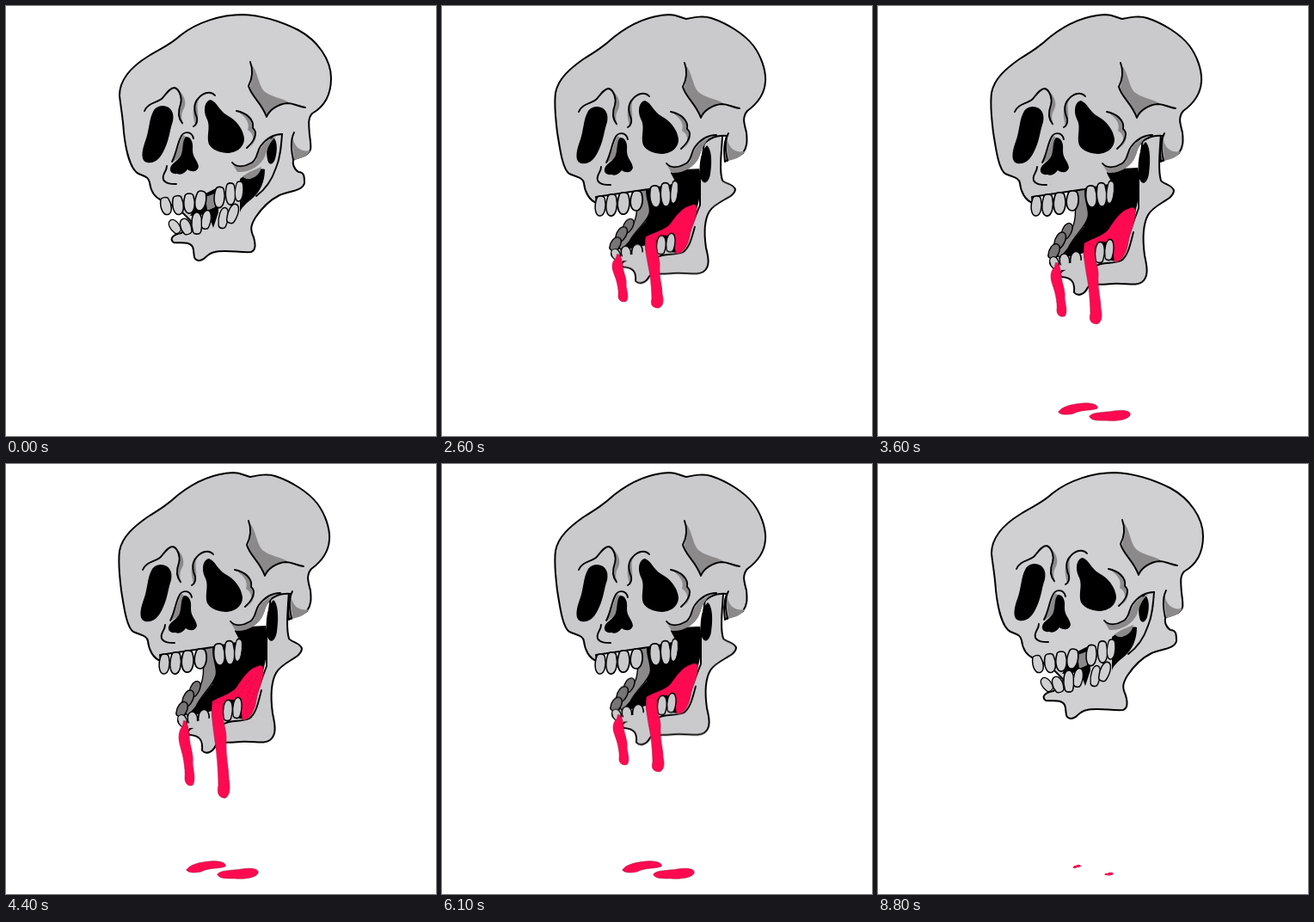
These frames come from a looping animation (500 by 500 pixels, 8900 ms). An HTML page without scripts:

```html
<!DOCTYPE html>
<html lang="en">
<head>
<meta charset="utf-8">
<title>Skull</title>
<style>
html, body { margin: 0; width: 100%; height: 100%; overflow: hidden; background: #fff; }
svg { display: block; width: 100vw; height: 100vh; }
path { stroke-linecap: round; stroke-linejoin: round; }
.bone { fill: var(--bone); stroke: #000; stroke-width: 2; }
.tooth { stroke: #000; stroke-width: 1.6; }
.line { fill: none; stroke: #000; stroke-width: 1.9; }
.gray { fill: #8b898a; }
.red { fill: #ff0a50; stroke: #a8123f; stroke-width: .6; }
.closed { --bone: #d0d0d2; }
.open { --bone: #cacacc; }
.closed, .open, .jaw, .pool, .hatch, .drip, .drop, .puddle, .bead {
  animation: 8.9s step-end infinite;
}
.closed { animation-name: closed; }
.open { animation-name: open; }
.jaw { animation-name: jaw; transform-origin: 340px 200px; }
.pool { animation-name: pool; }
.hatch { animation-name: hatch; }
.drip { animation-name: drip; }
.drip.a { transform-origin: 207px 298px; }
.drip.b { transform-origin: 246px 278px; }
.drop { animation-name: drop; }
.puddle { animation-name: puddle; }
.puddle.a { transform-origin: 231px 468px; }
.puddle.b { transform-origin: 268px 477px; }
.bead { animation-name: bead; }
.bead.a { transform-origin: 204px 253px; }
.bead.b { transform-origin: 243px 245px; }

@keyframes closed {
  0%, 74.157% { opacity: 1; }
  28.089% { opacity: 0; }
}
@keyframes open {
  0%, 74.157% { opacity: 0; }
  28.089% { opacity: 1; }
}
@keyframes jaw {
  0%, 28.089% { transform: translate(-6px) scaleY(.8); }
  29.213% { transform: translate(-3px) scaleY(.9); }
  30.337% { transform: none; }
  68.539% { transform: translate(-2px) scaleY(.93); }
  70.786% { transform: translate(-4px) scaleY(.87); }
  71.91% { transform: translate(-6px) scaleY(.82); }
  73.033% { transform: translate(-8px) scaleY(.77); }
}
@keyframes pool {
  0%, 73.033% { opacity: 0; }
  29.213% { opacity: 1; }
}
@keyframes hatch {
  0%, 44.943%, 51.685%, 59.55% { opacity: 0; }
  42.696%, 49.438%, 56.179% { opacity: 1; }
}
@keyframes drip {
  0% { transform: scaleY(.3); }
  29.213% { transform: scaleY(.75); }
  30.337% { transform: scaleY(1.25); }
  32.584% { transform: none; }
  34.831%, 38.202%, 42.696%, 49.438%, 56.179% { transform: scaleY(.92); }
  35.955%, 39.325%, 44.943%, 51.685%, 59.55% { transform: scaleY(1.01); }
  37.078%, 40.449%, 47.191%, 53.932%, 64.044% { transform: scaleY(.765); }
  70.786% { transform: scaleY(.5); }
  71.91% { transform: scaleY(.25); }
  73.033% { transform: scaleY(0); }
}
@keyframes drop {
  0%, 37.078% { opacity: 0; }
  32.584% { opacity: 1; }
  34.831% { opacity: 1; transform: translateY(14px); }
  35.955% { opacity: 1; transform: translateY(32px); }
}
@keyframes puddle {
  0% { transform: scale(0); }
  37.078% { transform: scale(.4, .6); }
  38.202% { transform: scale(.75, .85); }
  39.325% { transform: none; }
  96.629% { transform: scale(.75, .8); }
  97.752% { transform: scale(.45, .5); }
  98.876% { transform: scale(.21, .28); }
}
@keyframes bead {
  0%, 28.089% { opacity: 0; }
  22.471% { opacity: 1; }
  25.842% { opacity: 1; transform: scaleY(1.42); }
}
</style>
</head>
<body>
<svg viewBox="0 0 500 500">
<defs>
  <path id="t" class="tooth" d="M-5 -9C-4 -13 4 -13 5 -9C8 0 6 10 1 11C-5 12 -8 2 -5 -9Z"/>
  <g id="face">
    <path d="M183 116C192 117 196 124 194 134C190 146 190 154 185 165C180 177 173 184 164 182C156 180 158 168 162 157C167 144 166 131 172 121C175 117 179 116 183 116Z"/>
    <path d="M238 109C246 112 247 121 257 127C267 132 276 143 277 154C277 165 267 171 257 171C246 170 236 166 235 157C234 147 238 139 233 130C229 121 231 110 238 109Z"/>
    <path d="M209 152C215 152 218 158 217 167C217 177 223 179 224 187C222 194 215 193 211 190C208 194 204 197 199 195C192 196 189 191 192 186C195 181 202 179 204 171C205 163 203 155 209 152Z"/>
    <path class="gray" d="M197 95C206 101 211 111 207 119C203 126 204 131 206 139C199 132 200 124 203 116C204 107 202 101 197 95Z"/>
    <path class="line" d="M161 122C165 112 176 113 182 107C187 101 191 95 196 95C202 97 205 107 203 114C200 122 200 130 205 136"/>
    <path class="gray" d="M225 107C219 115 227 126 221 140C217 130 215 115 225 107Z"/>
    <path class="line" d="M243 104C238 98 229 101 224 107C217 114 219 123 222 130C223 135 221 138 218 140"/>
    <path class="gray" d="M193 182C199 172 201 160 206 150L209 152C204 158 207 169 202 176Z"/>
    <path class="line" d="M193 181C198 172 199 161 203 153C206 145 216 145 218 154"/>
    <path class="line" d="M187 186C187 193 181 195 183 202C186 207 192 207 198 207"/>
    <path class="gray" d="M268 122C281 123 291 132 286 142C294 148 291 157 284 164C289 155 288 148 281 144C284 135 278 128 268 122Z"/>
    <path class="line" d="M268 122C279 124 289 132 287 142C294 147 288 158 280 165"/>
    <path class="gray" d="M285 67C293 76 293 91 300 99C308 106 321 107 329 112C320 113 308 118 303 129C297 116 287 106 283 96C287 86 286 77 285 67Z"/>
    <path class="line" d="M284 65C288 76 286 85 282 93C285 105 297 112 303 129C306 121 316 114 327 113C335 113 340 117 348 118"/>
    <path class="gray" d="M263 183C272 188 286 185 291 179C293 171 296 163 304 157L316 150C306 158 304 166 301 175C296 186 283 194 269 193Z"/>
    <path class="line" d="M263 182C269 189 279 186 286 182C293 177 291 170 296 163C302 155 311 149 321 149"/>
    <path class="gray" d="M333 152C332 166 336 172 334 179C345 177 351 174 354 168C344 170 336 166 333 152Z"/>
    <path class="line" d="M335 147C330 157 332 169 334 179"/>
  </g>
</defs>

<g class="closed">
  <path class="bone" d="M181 226C172 222 168 214 167 205C166 199 161 198 154 195C144 190 139 165 137 147C136 130 133 115 132 104C132 84 148 69 166 58C180 49 190 46 203 34C222 19 250 10 275 10C300 11 322 19 340 28C362 40 378 62 378 84C378 104 370 117 356 125C351 130 352 138 353 150C354 157 355 163 354 167C351 175 340 176 335 178C332 182 335 190 340 193C347 193 347 199 347 206C345 215 330 215 318 220C306 226 296 237 290 246C284 256 284 260 288 269C290 276 291 284 285 286C272 287 255 283 243 286C232 288 232 296 224 296C216 295 220 287 217 280C213 273 203 276 195 275C190 271 193 266 204 264L216 251L200 235Z"/>
  <path d="M309 152C316 154 316 168 313 178C310 186 305 185 304 178C302 169 304 159 309 152ZM272 201C282 194 292 188 301 190C301 204 296 216 285 225C279 230 274 234 272 240Z"/>
  <path class="gray" d="M283 193L297 187C296 194 291 199 284 201C280 202 277 200 275 198Z"/>
  <path class="line" d="M321 149C320 163 319 176 314 188C309 203 302 213 291 221"/>
  <path d="M228 220L246 211L247 240L241 258L235 242L214 244Z"/>
  <path class="gray" d="M232 222L243 218L243 234L234 238Z"/>
  <use href="#face"/>
  <g fill="#d0d0d2">
    <use href="#t" transform="translate(186 233)rotate(-12)scale(.95 .88)"/>
    <use href="#t" transform="translate(200 232)rotate(-6)scale(1 .95)"/>
    <use href="#t" transform="translate(213 230)"/>
    <use href="#t" transform="translate(226 227)rotate(10)"/>
    <use href="#t" transform="translate(248 223)rotate(4)scale(.95 1.05)"/>
    <use href="#t" transform="translate(261 219)scale(.9 1.1)"/>
    <use href="#t" transform="translate(271 216)rotate(5)scale(.75 1)"/>
    <use href="#t" transform="translate(196 256)rotate(145)scale(.85 .75)"/>
    <use href="#t" transform="translate(209 256)rotate(160)scale(.95 .82)"/>
    <use href="#t" transform="translate(222 252)rotate(180)scale(.95 1.1)"/>
    <use href="#t" transform="translate(233 248)rotate(190)scale(.85 .95)"/>
    <use href="#t" transform="translate(253 246)rotate(190)scale(.85 1.05)"/>
    <use href="#t" transform="translate(264 241)rotate(200)scale(.9 1)"/>
  </g>
  <path class="red bead a" d="M203 254C203 259 209 261 208 266C207 270 203 270 202 267C201 262 201 257 203 254Z"/>
  <path class="red bead b" d="M243 246C245 253 249 257 249 263C249 269 246 271 243 269C240 265 243 259 242 254Z"/>
  <path class="bead b" fill="none" stroke="#d6a0b0" stroke-width="1.3" d="M245 259C247 262 247 265 245 267"/>
</g>

<g class="open">
  <g class="jaw">
    <path class="bone" d="M331 120C328 165 325 190 329 203C333 208 343 208 344 215C343 226 322 229 314 243C307 256 308 275 310 290C312 300 316 314 307 321C300 326 290 322 272 323C258 325 248 322 244 327C240 336 232 338 228 333C229 322 226 316 214 315C209 313 212 308 218 306C208 306 200 304 200 298L212 288L290 270L303 235L303 195L312 120Z"/>
    <path d="M311 158C317 163 317 181 315 195C313 207 307 209 304 201C301 188 303 166 311 158ZM264 190L302 188C304 205 304 222 300 237L290 270L274 298L253 284L210 294L240 256L240 208Z"/>
    <path class="gray" stroke="#000" stroke-width="1.4" d="M232 214L241 212C239 226 247 238 244 246C241 258 227 268 221 282L212 293L207 288L224 262C230 252 231 236 228 222Z"/>
    <g fill="#777576">
      <use href="#t" transform="translate(220 261)rotate(205)scale(.85 .8)"/>
      <use href="#t" transform="translate(212 272)rotate(205)scale(.9 .85)"/>
      <use href="#t" transform="translate(205 285)rotate(205)scale(.9 .8)"/>
    </g>
    <g fill="#cacacc">
      <use href="#t" transform="translate(205 298)rotate(160)scale(.8 .6)"/>
      <use href="#t" transform="translate(217 296)rotate(175)scale(.9 .7)"/>
      <use href="#t" transform="translate(230 295)rotate(185)scale(1 .85)"/>
    </g>
    <path fill="#cacacc" d="M210 302L252 292L282 298L282 306L212 307Z"/>
    <path class="line" d="M252 303C262 296 272 301 283 296C291 290 293 278 297 263"/>
    <g class="pool">
      <path class="red" d="M240 276C250 270 261 268 268 260C275 249 283 238 291 236C297 233 300 234 299 242C299 253 293 262 291 275C289 286 285 296 276 298C272 292 276 281 270 276C264 273 259 273 253 279L251 294L240 293Z"/>
      <path class="hatch" fill="none" stroke="#9c2145" stroke-width=".8" stroke-dasharray="2 3" d="M262 269L275 257M267 273L286 247M280 270L294 243M279 286L291 262"/>
    </g>
    <g fill="#cacacc">
      <use href="#t" transform="translate(258 286)rotate(184)scale(.85 1.05)"/>
      <use href="#t" transform="translate(269 283)rotate(186)scale(.8 1.05)"/>
    </g>
    <path class="red drip a" d="M207 298C211 300 212 307 213 318C214 331 218 341 217 352C218 363 221 374 217 380C213 382 208 379 208 371C209 358 206 344 203 332C200 322 200 312 205 306Z"/>
    <path class="red drip b" d="M240 278C245 275 252 276 252 285C251 299 256 310 256 322C255 344 259 358 259 374C261 386 260 395 255 398C248 398 245 393 247 382C247 361 245 342 243 326C241 309 238 292 240 278Z"/>
  </g>
  <path class="bone" d="M180 229C171 226 166 216 165 206C164 199 156 199 148 195C140 190 137 165 134 147C132 130 130 115 132 101C135 84 150 72 164 62C180 52 188 47 200 36C219 21 242 11 264 10C274 10 278 14 284 15C294 13 304 11 313 14C331 20 351 32 362 46C371 58 377 75 376 88C375 104 366 114 355 122C349 129 351 136 354 147C355 157 355 164 350 171C344 176 335 176 329 181C328 171 327 162 331 151C318 150 306 155 301 166C298 180 285 192 267 194L274 207L240 213L179 222Z"/>
  <use href="#face" x="-2" y="1"/>
  <g fill="#cacacc">
    <use href="#t" transform="translate(184 233)rotate(4)scale(.95 1)"/>
    <use href="#t" transform="translate(197 232)rotate(4)scale(1 1.1)"/>
    <use href="#t" transform="translate(211 230)rotate(3)scale(1.1 1.1)"/>
    <use href="#t" transform="translate(226 227)rotate(5)scale(1.1 1)"/>
    <use href="#t" transform="translate(248 222)rotate(-4)scale(1 1.1)"/>
    <use href="#t" transform="translate(260 220)rotate(-2)scale(.9 1.2)"/>
    <use href="#t" transform="translate(270 217)rotate(6)scale(.65 1.15)"/>
  </g>
</g>

<path class="red drop" d="M220 393C226 391 230 400 230 407C230 414 226 419 222 418C217 414 217 399 220 393Z"/>
<path class="red drop" d="M256 412C262 412 266 422 266 432C267 442 264 448 259 447C253 442 251 430 251 425C251 419 253 415 256 412Z"/>
<path class="red puddle a" d="M210 472C213 466 225 463 237 462C249 461 257 464 255 468C247 471 236 469 227 474C218 476 211 475 210 472Z"/>
<path class="red puddle b" d="M246 477C249 472 262 473 274 471C286 469 295 471 293 476C290 481 279 483 266 482C255 482 247 482 246 477Z"/>
</svg>
</body>
</html>
```
